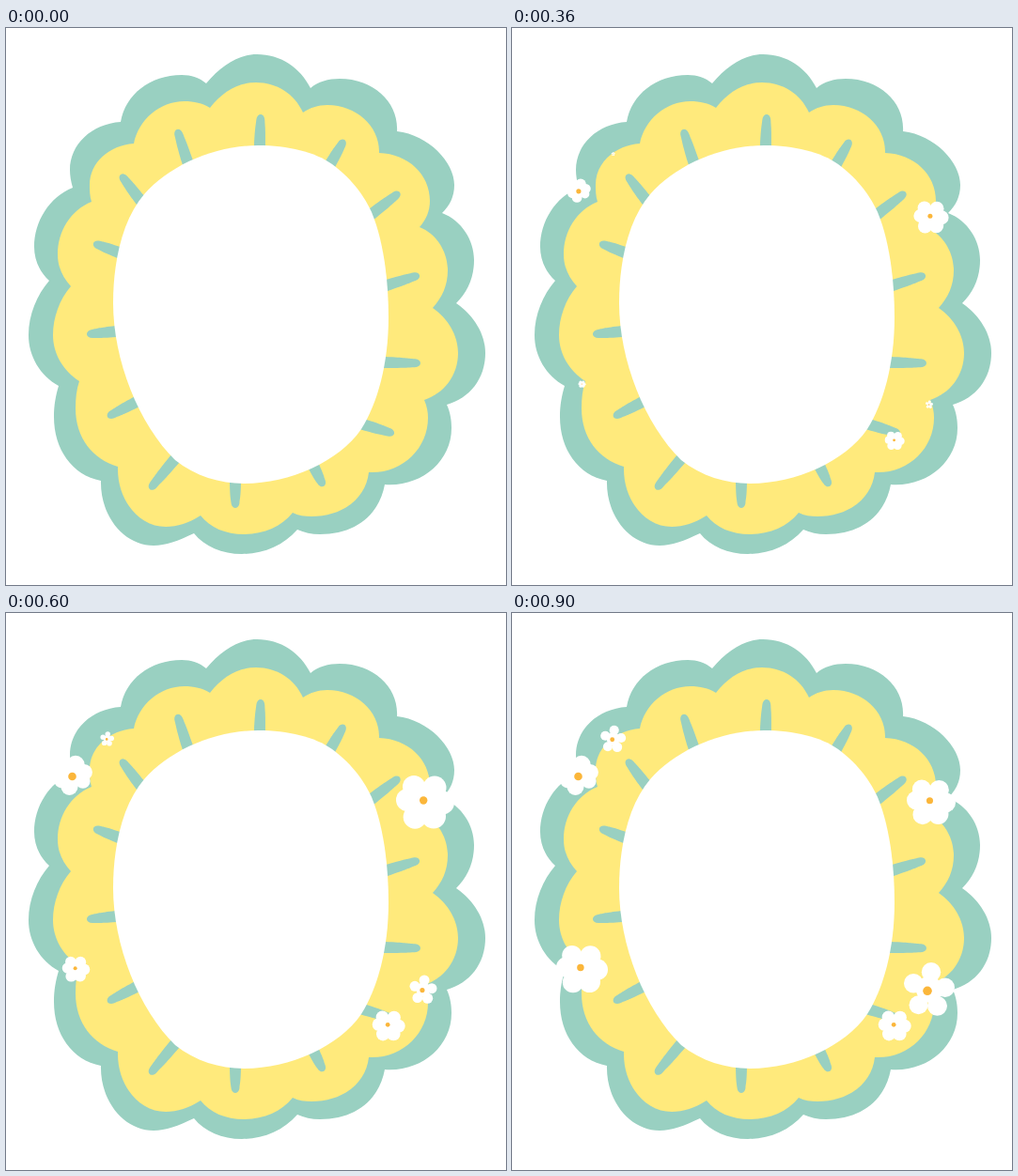
An HTML page for the animation above (2.4 s loop, 532 by 593 pixels).

```html
<!DOCTYPE html>
<html lang="en">
<head>
<meta charset="utf-8">
<title>Flower frame</title>
<style>
  html, body { margin: 0; width: 100%; height: 100%; overflow: hidden; background: #fff; }
  svg { display: block; width: 532px; height: 593px; }
  .teal { fill: #99d0c1; }
  .yellow { fill: #ffea7c; }
  .white { fill: #fff; }
  .dot { fill: #fbb63a; }
</style>
</head>
<body>
<svg viewBox="0 0 532 593">
  <path class="teal" d="M213 59C229 40 247 28 267 28C292 28 313 42 324 64
    C332 57 343 54 355 54C392 54 418 80 416 110
    C450 114 477 143 477 167C477 180 472 189 464 197
    C485 205 498 226 498 247C498 266 491 281 479 293
    C498 306 510 326 510 346C510 374 493 394 469 401
    C473 410 474 418 474 426C474 462 441 489 403 486
    C397 519 371 539 334 539C325 539 317 537 310 534
    C295 551 274 560 251 560C230 560 211 552 200 538
    C183 546 170 551 157 551C126 551 100 520 101 482
    C70 476 51 448 51 414C51 401 53 391 56 381
    C36 370 24 349 24 327C24 305 33 284 46 269
    C36 260 30 247 30 233C30 206 46 180 71 170
    C69 163 68 157 68 151C68 124 91 102 122 100
    C127 71 153 50 187 50C197 50 206 53 213 59Z"/>
  <path class="yellow" d="M217 85C230 68 247 58 266 58C288 58 307 70 316 90
    C323 85 332 82 342 82C373 82 398 105 397 133
    C428 134 451 156 451 184C451 195 447 204 440 212
    C458 219 470 238 470 258C470 274 464 287 454 298
    C470 309 481 327 481 346C481 370 466 389 445 396
    C448 403 449 409 449 415C449 448 421 475 386 473
    C383 501 358 520 325 520C318 520 311 519 305 516
    C293 531 274 539 253 539C234 539 217 532 207 519
    C195 527 182 531 170 531C141 531 118 502 119 467
    C92 459 74 436 74 405C74 394 75 385 78 376
    C60 364 50 346 50 327C50 308 57 289 69 275
    C60 265 55 254 55 241C55 216 69 194 91 185
    C89 179 89 173 89 167C89 143 110 125 136 123
    C141 98 163 78 190 78C200 78 209 80 217 85Z"/>
  <g id="ticks" class="teal"></g>
  <path class="white" d="M268 125C300 125 329 132 347 145C370 162 382 181 389 196
    C401 225 407 266 407 308C407 358 395 400 378 427C354 462 301 485 253 485
    C228 485 201 477 180 460C141 422 114 353 114 293
    C114 248 124 204 147 177C174 146 222 125 268 125Z"/>
  <g id="flowers"></g>
</svg>
<script>
const LOOP = 2400, STEP = 30;

function add(parent, tag, attrs) {
  const el = document.createElementNS('http://www.w3.org/2000/svg', tag);
  for (const key in attrs) el.setAttribute(key, attrs[key]);
  return parent.appendChild(el);
}

// Each tick: base x, y, tip x, y
const ticks = [
  [270, 125, 271, 92], [345, 145, 360, 119], [388, 199, 419, 175], [405, 274, 440, 263],
  [403, 356, 441, 357], [380, 422, 413, 432], [327, 466, 338, 488], [244, 484, 244, 511],
  [178, 461, 153, 491], [137, 399, 108, 414], [117, 323, 86, 326], [120, 239, 93, 229],
  [142, 182, 122, 156], [193, 142, 182, 108]
];
for (const [x, y, tx, ty] of ticks) {
  const len = Math.hypot(tx - x, ty - y);
  const angle = Math.atan2(ty - y, tx - x) * 180 / Math.PI;
  const mid = len * 0.6, end = len - 6, over = len + 2;
  add(document.getElementById('ticks'), 'path', {
    d: `M-8 -6L0 -6C${mid} -5.6 ${mid} -5 ${end} -4.5C${over} -4 ${over} 4 ${end} 4.5C${mid} 5 ${mid} 5.6 0 6L-8 6Z`,
    transform: `translate(${x} ${y}) rotate(${angle})`
  });
}

// Petals are x, y, radius around the growth point
const shapes = {
  broad: {
    size: 62, core: 19, dot: [-1.8, -2, 4.2],
    petals: [[-12, -16.5, 12], [10, -15.5, 12.5], [18.5, 0.5, 12.5],
             [9, 15, 13], [-10.8, 15.7, 12.5], [-19, -2.5, 12]]
  },
  star: {
    size: 54, core: 14, dot: [-2, 1.5, 4.8],
    petals: [[2, -18.5, 10.2], [16.8, -2, 10.2], [8.5, 17.5, 10.5],
             [-11.5, 16.5, 10], [-16.8, -6.5, 10.2]]
  },
  loose: {
    size: 41, core: 11.5, dot: [-1, 0.5, 4.3],
    petals: [[2.5, -12, 9.7], [11.8, -4, 8.6], [10.3, 5.5, 7.8],
             [-4, 11.5, 9], [-12, 4.5, 8.5]]
  }
};

// Keys are [time, width]
const early = size => [[0, 0], [600, size]];
const late = size => [[270, 0], [885, size]];
const flowers = [
  { shape: 'loose', x: 71.5, y: 173.5, keys: early(41) },
  { shape: 'broad', x: 446, y: 201.5, keys: [[0, 0], [600, 62], [900, 52]] },
  { shape: 'broad', x: 407.2, y: 439.5, keys: early(35) },
  { shape: 'star', x: 107.7, y: 134, keys: late(27) },
  { shape: 'star', x: 444, y: 400.8, keys: late(54) },
  { shape: 'broad', x: 74.5, y: 379.2, keys: late(55) }
];
for (const flower of flowers) {
  const { petals, core, dot } = shapes[flower.shape];
  const circle = (name, [cx, cy, r]) => add(flower.el, 'circle', { class: name, cx, cy, r });
  flower.el = add(document.getElementById('flowers'), 'g', {});
  for (const petal of [[0, 0, core], ...petals]) circle('white', petal);
  circle('dot', dot);
}

function valueAt(keys, t) {
  if (t <= keys[0][0]) return keys[0][1];
  for (let i = 1; i < keys.length; i++) {
    const [t0, v0] = keys[i - 1], [t1, v1] = keys[i];
    if (t < t1) return v0 + (v1 - v0) * (t - t0) / (t1 - t0);
  }
  return keys[keys.length - 1][1];
}

function draw(time) {
  const t = Math.floor(time % LOOP / STEP) * STEP;
  for (const { el, shape, x, y, keys } of flowers) {
    const scale = valueAt(keys, t) / shapes[shape].size;
    el.setAttribute('transform', `translate(${x} ${y}) scale(${scale})`);
    el.setAttribute('visibility', scale > 0 ? 'visible' : 'hidden');
  }
}

const start = performance.now();
function tick() {
  draw(performance.now() - start);
  requestAnimationFrame(tick);
}
tick();
</script>
</body>
</html>
```
